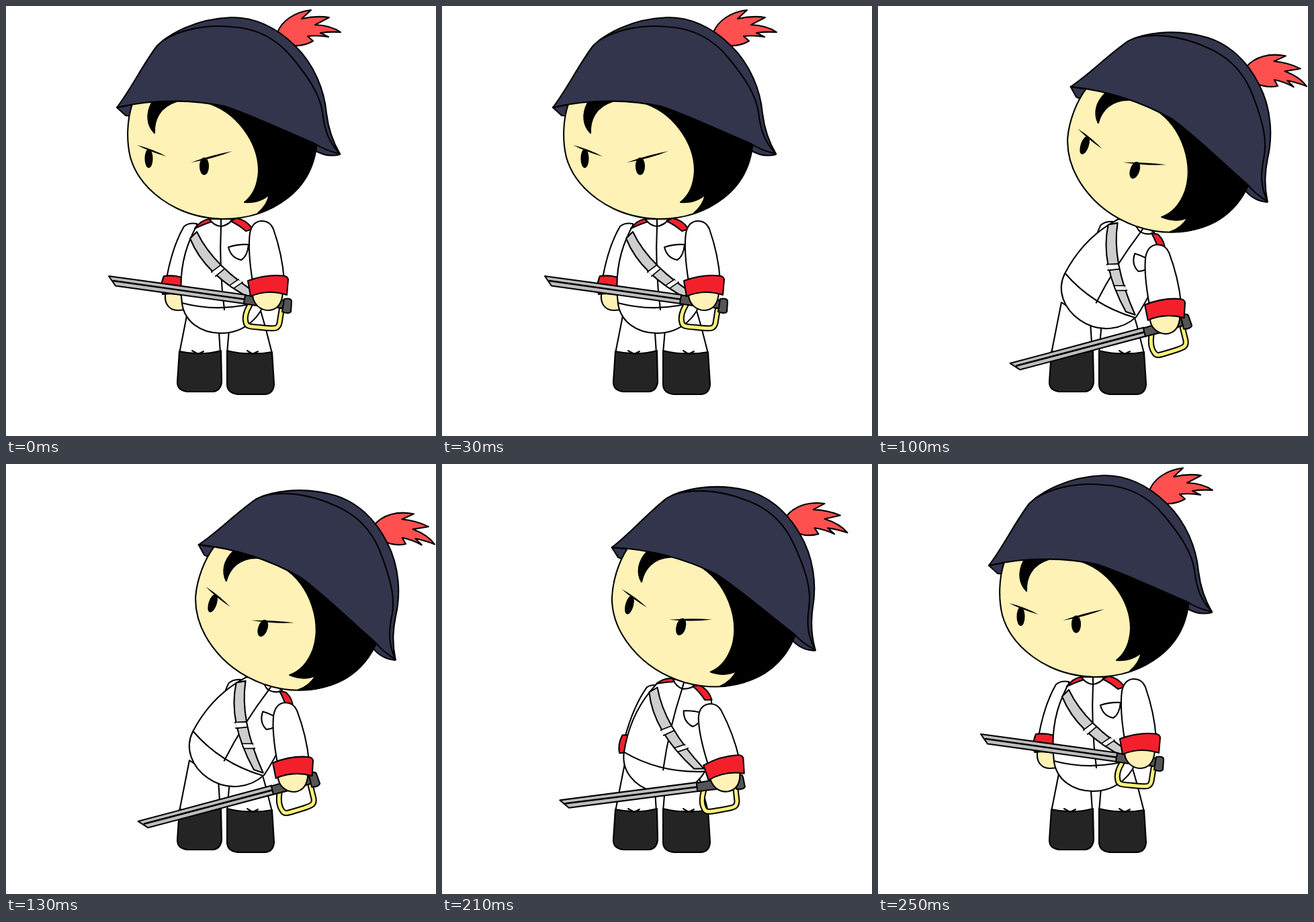
These frames come from a looping animation (640x640 px, 0.3 s). An HTML page:

```html
<!DOCTYPE html>
<html lang="en">
<head>
<meta charset="utf-8">
<title>Little soldier</title>
<style>
  html, body { margin: 0; width: 100%; height: 100%; overflow: hidden; background: #fff; }
  svg { display: block; width: 100%; height: 100%; }
  .ink { stroke: #000; stroke-width: 2.1; stroke-linejoin: round; stroke-linecap: round; }
  .line { fill: none; }
  .white { fill: #fff; }
  .skin { fill: #fff2b6; }
  .red { fill: #f3202c; }
  .hat { fill: #33354d; }
  .boot { fill: #242424; }
  .strap { fill: #cecece; }
  .steel { fill: #bdbdbd; }
  .hilt { fill: #555; }
</style>
</head>
<body>
<svg viewBox="0 0 640 640">
  <g id="farArm" class="ink">
    <path id="farHand" class="skin" d="M238 424C234 442 242 453 256 453L268 452 264 422Z"/>
    <path class="white" d="M284 324Q272 322 265 328C252 350 244 378 239 405L262 405 282 350Z"/>
    <path class="red" d="M235 402Q248 400 262 404L261 430Q246 427 233 429 229 416 235 402Z"/>
  </g>

  <g class="ink">
    <path class="white" d="M273 441L258 517H319L316 470Z"/>
    <path class="white" d="M333 470L329 517H396L386 478 378 450Z"/>
    <path class="boot" d="M258 514Q290 521 320 513L321 560Q319 573 308 574H270Q255 572 255 560Z"/>
    <path class="boot" d="M329 513Q362 521 396 515L399 563Q398 577 386 578H345Q329 576 329 563Z"/>
    <path class="line" d="M277 513L286 518 294 514M359 513L367 518 375 514"/>
  </g>

  <g id="torso" class="ink">
    <path class="white" d="M303 317L282 330 275 345C262 375 258 410 262 443 266 470 290 487 320 487 356 487 380 462 386 436 386 400 378 360 366 332L337 317Z"/>
    <path class="line" d="M262 442Q322 458 384 438M320 328Q317 390 325 452M303 318Q310 327 320 328 331 326 337 318M320 317V328"/>
    <path class="line" d="M331 359Q346 354 361 355C360 366 357 374 350 378Q335 375 331 359Z"/>
    <path class="strap" d="M284 336Q309 389 383 434L369 438Q296 401 274 346Z"/>
    <path class="line" d="M319 386L306 396M325 391L312 402M346 407L333 416M352 411L339 420"/>
    <path fill="#fff" stroke="none" d="M319 387L307 396 312 401 324 391ZM346 408L334 416 339 419 351 411Z"/>
    <path class="red" d="M281 331Q290 319 302 317L306 321Q294 325 281 331Z"/>
    <path class="red" d="M334 320L343 316Q358 318 367 332L357 335Q347 326 334 320Z"/>
  </g>

  <g id="sword" class="ink">
    <path id="guard" class="line" style="stroke-width:9" d="M363 445C357 455 355 464 357 471 358 478 366 477 384 479 402 481 405 480 407 472L410 453"/>
    <use href="#guard" style="stroke:#fbf07a"/>
    <path class="steel" d="M153 402L357 430 355 443 163 416.500Z"/>
    <path class="line" style="stroke-width:2.600" d="M160 409L355 436.500"/>
    <path class="hilt" d="M356 430.500L380 433 414 438V450L380 447 354 443Z"/>
    <path class="hilt" d="M414 436Q425 434 425 440L424 455Q421 459 411 455Z"/>
  </g>

  <g id="arm" class="ink">
    <path class="skin" d="M367 426C366 443 378 453 391 453 404 452 411 443 412 426Z"/>
    <path class="white" d="M367 410C363 385 360 360 363 338 366 324 374 320 381 320 390 320 395 325 398 332 405 352 412 380 414 408Z"/>
    <path class="red" d="M360 409Q387 399 412 401.500 419 402 420 407L418 430Q390 421 364 432 362 420 360 409Z"/>
  </g>

  <g id="head" class="ink">
    <path class="hat" d="M165 151L178 163 200 165V145ZM455 195L460 215Q478 226 497 221Z"/>
    <path class="skin" d="M188 146C180 170 179 200 185 225 198 271 250 315 322 317 400 317 458 270 463 200L440 110H230Z"/>
    <path d="M295 143C345 156 376 205 376 245 375 268 368 282 355 292 372 293 384 288 392 280 390 292 383 302 374 309 424 292 459 258 463 200L440 150Z"/>
    <path d="M217 144C208 161 210 178 221 189 220 170 228 150 254 142Z"/>
    <ellipse cx="212.500" cy="227" rx="5" ry="13"/>
    <ellipse cx="295" cy="238.500" rx="6" ry="12"/>
    <path stroke="none" d="M195 207Q219 213 239 224 214 217 195 207ZM275 233Q305 222 337 216 310 227 275 233Z"/>
    <path style="fill:#ff5050" d="M404 39C411 22 429 9 454 6L440 19Q462 14 481 17L460 28Q484 29 498 39 482 38 468 40L480 46Q464 43 449 45L457 52Q444 60 428 59Z"/>
    <path class="hat" d="M165 151C186 124 203 88 225 59 242 42 282 19 335 17 368 16 402 31 430 59 459 87 474 126 477 160 480 185 488 205 497 220Q475 215 460 205C410 184 363 161 325 149 270 138 215 140 165 151Z"/>
    <path class="line" d="M234 51C258 36 295 27 335 31 375 33 405 51 426 77 450 106 467 131 471 158 474 185 480 202 497 220"/>
  </g>
</svg>
<script>
  // Rest pivot of each part
  const pivots = {
    head: [333.6, 175],
    torso: [309.5, 394.5],
    arm: [390, 406],
    sword: [425, 446],
    farArm: [272, 326]
  };

  // Pivot position and turn for each held pose
  const rest = { at: 0 };
  for (const part in pivots) rest[part] = [...pivots[part], 0];
  const poses = [
    rest,
    { at: 50, head: [363.6, 179.6, 8.5], torso: [317.2, 392.4, 9],
      arm: [397, 418, -9], sword: [431, 454, -6.1], farArm: [291, 329, 12] },
    { at: 100, head: [439, 196.4, 18.5], torso: [344.5, 385.5, 34.5],
      arm: [427, 441, -1.5], sword: [464.5, 467, -22.8], farArm: [338, 324, -5] },
    { at: 150, head: [409.4, 191, 15], torso: [329.5, 395.8, 15.5],
      arm: [418.5, 441, -8.5], sword: [449.5, 471.5, -15.2], farArm: [312, 331, 5] },
    { ...rest, at: 250 }
  ];

  const loop = 300;
  const get = id => document.getElementById(id);

  function draw(ms) {
    const t = ms % loop;
    const pose = poses.filter(p => p.at <= t).pop();
    for (const part in pivots) {
      const [x, y, turn] = pose[part];
      const [px, py] = pivots[part];
      get(part).setAttribute('transform',
        `translate(${x} ${y}) rotate(${turn}) translate(${-px} ${-py})`);
    }
    // The far hand goes behind the body when it leans
    get('farHand').style.display = pose.torso[2] > 10 ? 'none' : '';
  }

  // Yellow core inside the black edge of the guard
  const core = get('guard').cloneNode();
  core.removeAttribute('id');
  core.style.stroke = '#fbf07a';
  core.style.strokeWidth = 5;
  get('sword').querySelector('use').replaceWith(core);

  const start = performance.now();
  function tick() {
    draw(performance.now() - start);
    requestAnimationFrame(tick);
  }
  draw(0);
  requestAnimationFrame(tick);
</script>
</body>
</html>
```
